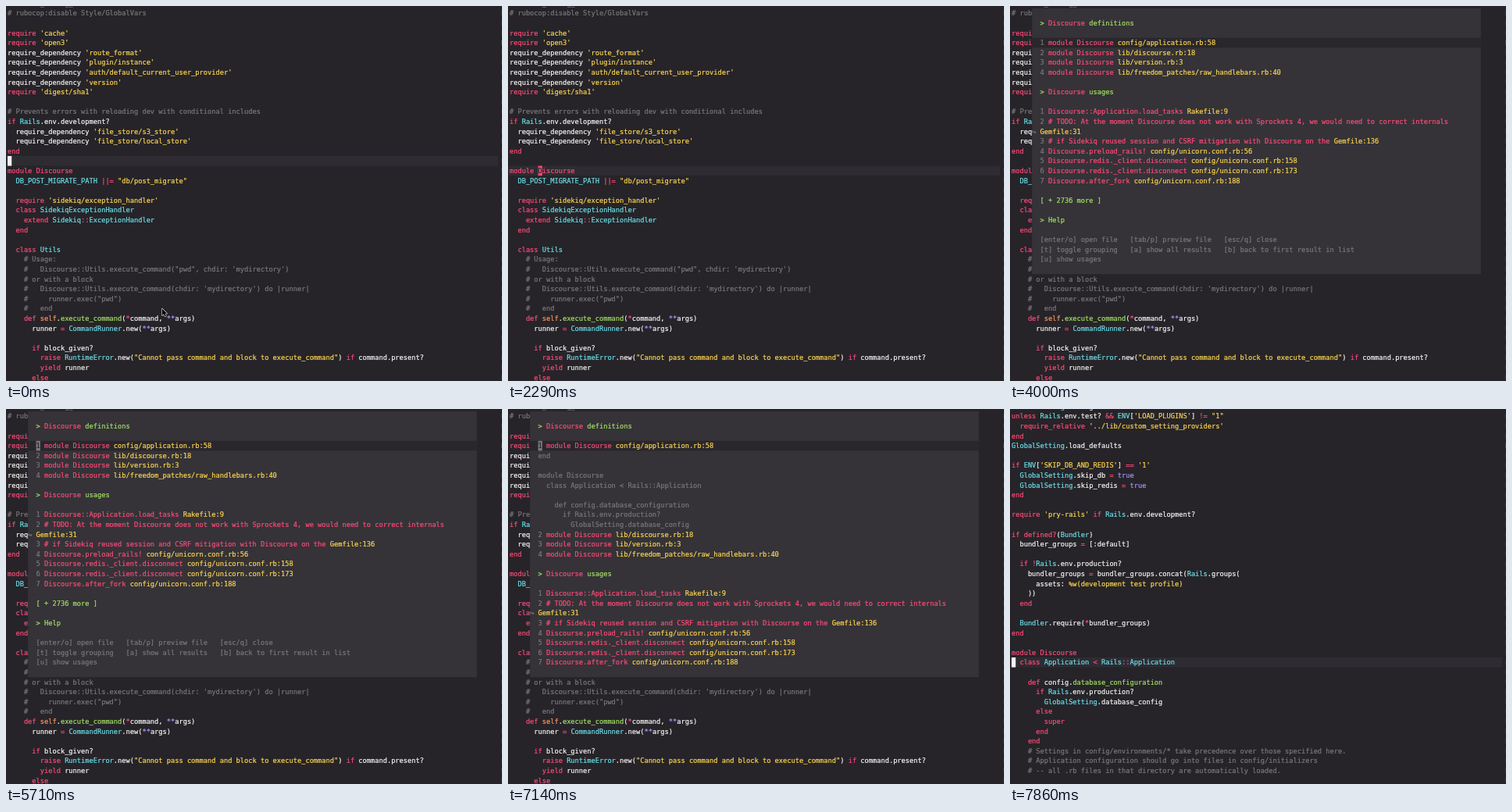
Write an HTML page with a canvas that moves like this. It is 635x480 px and loops after 8000 ms.

```html
<!DOCTYPE html>
<html lang="en">
<head>
<meta charset="utf-8">
<title>Jump to definition</title>
<style>
  html, body { margin: 0; width: 100%; height: 100%; overflow: hidden; background: #262429; }
  canvas { display: block; width: 635px; height: 480px; }
</style>
</head>
<body>
<canvas id="stage" width="635" height="480"></canvas>
<script>
const LOOP = 8000;
const LEFT = 2, TOP = 3, CELL_W = 5.225, CELL_H = 12.6, BASELINE = 9.4;
const BG = '#262429', LINE_BG = '#2e2c32', POPUP_BG = '#353338', POPUP_LINE = '#29272c';
const INK = {
  w: '#f8f6f3', p: '#ff4a78', y: '#ffd650', c: '#6ae0ea',
  g: '#a5e164', v: '#a795f6', o: '#ff9560', k: '#7a787b'
};

const canvas = document.getElementById('stage');
const ctx = canvas.getContext('2d');
ctx.font = '8.68px "DejaVu Sans Mono", "Liberation Mono", monospace';
ctx.letterSpacing = (CELL_W - ctx.measureText('m'.repeat(100)).width / 100) + 'px';

const library = String.raw`# frozen_string_literal: true
# rubocop:disable Style/GlobalVars

require 'cache'
require 'open3'
require_dependency 'route_format'
require_dependency 'plugin/instance'
require_dependency 'auth/default_current_user_provider'
require_dependency 'version'
require 'digest/sha1'

# Prevents errors with reloading dev with conditional includes
if Rails.env.development?
  require_dependency 'file_store/s3_store'
  require_dependency 'file_store/local_store'
end

module Discourse
  DB_POST_MIGRATE_PATH ||= "db/post_migrate"

  require 'sidekiq/exception_handler'
  class SidekiqExceptionHandler
    extend Sidekiq::ExceptionHandler
  end

  class Utils
    # Usage:
    #   Discourse::Utils.execute_command("pwd", chdir: 'mydirectory')
    # or with a block
    #   Discourse::Utils.execute_command(chdir: 'mydirectory') do |runner|
    #     runner.exec("pwd")
    #   end
    def self.execute_command(*command, **args)
      runner = CommandRunner.new(**args)

      if block_given?
        raise RuntimeError.new("Cannot pass command and block to execute_command") if command.present?
        yield runner
      else`;

const application = String.raw`require_relative '../app/models/global_setting'
GlobalSetting.configure!
unless Rails.env.test? && ENV['LOAD_PLUGINS'] != "1"
  require_relative '../lib/custom_setting_providers'
end
GlobalSetting.load_defaults

if ENV['SKIP_DB_AND_REDIS'] == '1'
  GlobalSetting.skip_db = true
  GlobalSetting.skip_redis = true
end

require 'pry-rails' if Rails.env.development?

if defined?(Bundler)
  bundler_groups = [:default]

  if !Rails.env.production?
    bundler_groups = bundler_groups.concat(Rails.groups(
      assets: %w(development test profile)
    ))
  end

  Bundler.require(*bundler_groups)
end

module Discourse
  class Application < Rails::Application

    def config.database_configuration
      if Rails.env.production?
        GlobalSetting.database_config
      else
        super
      end
    end
    # Settings in config/environments/* take precedence over those specified here.
    # Application configuration should go into files in config/initializers
    # -- all .rb files in that directory are automatically loaded.`;

// Popup lines: "~x" switches to ink x.
const definitions = `~k1 ~pmodule Discourse ~yconfig/application.rb:58
~k2 ~pmodule Discourse ~ylib/discourse.rb:18
~k3 ~pmodule Discourse ~ylib/version.rb:3
~k4 ~pmodule Discourse ~ylib/freedom_patches/raw_handlebars.rb:40`.split('\n');

const preview = `~kend

~kmodule Discourse
~k  class Application < Rails::Application

~k    def config.database_configuration
~k      if Rails.env.production?
~k        GlobalSetting.database_config`.split('\n');

const usages = `
~g> ~pDiscourse ~gusages

~k1 ~pDiscourse::Application.load_tasks ~yRakefile:9
~k2 ~p# TODO: At the moment Discourse does not work with Sprockets 4, we would need to correct internals
~yGemfile:31
~k3 ~p# if Sidekiq reused session and CSRF mitigation with Discourse on the ~yGemfile:136
~k4 ~pDiscourse.preload_rails! ~yconfig/unicorn.conf.rb:56
~k5 ~pDiscourse.redis._client.disconnect ~yconfig/unicorn.conf.rb:158
~k6 ~pDiscourse.redis._client.disconnect ~yconfig/unicorn.conf.rb:173
~k7 ~pDiscourse.after_fork ~yconfig/unicorn.conf.rb:188

~g[ + 2736 more ]

~g> Help

~k[enter/o] open file   [tab/p] preview file   [esc/q] close
~k[t] toggle grouping   [a] show all results   [b] back to first result in list
~k[u] show usages`.split('\n');

const heading = ['', '~g> ~pDiscourse ~gdefinitions', ''];
const resultList = [...heading, ...definitions, ...usages];
const previewList = [...heading, definitions[0], ...preview, ...definitions.slice(1), ...usages].slice(0, 27);

const RULES = [
  ['k', /^\s*#.*/],
  ['y', /'[^']*'|"[^"]*"|%w\([^)]*\)/],
  ['p', /module \w+/],
  ['g', /(?<=def \w+\.)\w+/],
  ['p', /(?<!\.)\b(?:require|require_relative|if|unless|else|end|class|extend|def|super|raise|yield)\b|defined\?/],
  ['o', /\bself\b/],
  ['v', /\btrue\b|\*\*/],
  ['c', /\b[A-Z]\w*/],
  ['p', /\|\|=|::|&&|[!=]=|[=<*]|!(?=[A-Z])/]
];
const lexer = new RegExp(RULES.map(r => '(' + r[1].source + ')').join('|'), 'g');

// Both parsers return runs of [column, text, ink].
function highlight(line) {
  const runs = [];
  let at = 0;
  for (const m of line.matchAll(lexer)) {
    if (m.index > at) runs.push([at, line.slice(at, m.index), 'w']);
    runs.push([m.index, m[0], RULES[m.slice(1).findIndex(g => g !== undefined)][0]]);
    at = m.index + m[0].length;
  }
  if (at < line.length) runs.push([at, line.slice(at), 'w']);
  return runs;
}

function parseMarkup(line) {
  let col = 0;
  return line.split('~').slice(1).map(part => {
    const run = [col, part.slice(1), part[0]];
    col += part.length - 1;
    return run;
  });
}

const files = [library, application].map(src => src.split('\n').map(highlight));
const popups = [resultList, previewList].map(list => list.map(parseMarkup));

const colX = col => LEFT + col * CELL_W;
const rowY = row => TOP + row * CELL_H;

function fill(color, x, y, w, h) {
  ctx.fillStyle = color;
  ctx.fillRect(x, y, w, h);
}

// A hairline stroke gives the glyphs their slightly heavy look.
function drawText(text, col, row, color) {
  ctx.fillStyle = ctx.strokeStyle = color;
  ctx.lineWidth = 0.2;
  ctx.fillText(text, colX(col), rowY(row) + BASELINE);
  ctx.strokeText(text, colX(col), rowY(row) + BASELINE);
}

function drawRuns(lines, col, row) {
  lines.forEach((runs, i) => {
    for (const [c, text, ink] of runs) drawText(text, col + c, row + i, INK[ink]);
  });
}

function drawBlock(col, row, char, ink) {
  fill(INK[ink], colX(col), rowY(row), CELL_W, CELL_H);
  if (char) drawText(char, col, row, BG);
}

function drawFile(lines, scroll, lineRow) {
  fill(BG, 0, 0, 635, 480);
  if (lineRow !== null) fill(LINE_BG, 0, rowY(lineRow), 630, CELL_H);
  drawRuns(lines.slice(scroll), 0, -1);
  for (let row = 0; row < 38; row++) fill('#3a383d', 634, rowY(row) + 3, 1, 6);
  fill('#8c2645', 634, 44, 1, 6);
}

function drawPopup(lines, blockOn) {
  fill(POPUP_BG, colX(5), rowY(0), 110 * CELL_W, 27 * CELL_H);
  fill(POPUP_LINE, colX(5), rowY(3), 110 * CELL_W, CELL_H);
  drawRuns(lines, 7, 0);
  drawText('↪', 5, lines === popups[0] ? 12 : 20, INK.k);
  if (blockOn) drawBlock(7, 3, '1', 'k');
}

const arrow = new Path2D('M0 0V8.6L2 6.8L3.4 10L4.9 9.3L3.5 6.2H6.2Z');

function drawPointer(t) {
  const u = Math.min(1, Math.max(0, (t - 100) / 1040));
  const e = u * u * (3 - 2 * u);
  ctx.save();
  ctx.translate(200 - 193 * e, 387.5 - 188 * e);
  ctx.lineWidth = 1.2;
  ctx.lineJoin = 'round';
  ctx.strokeStyle = '#e8e8e8';
  ctx.stroke(arrow);
  ctx.fillStyle = '#000';
  ctx.fill(arrow);
  ctx.restore();
}

const within = (t, from, to) => t >= from && t < to;

function render(t) {
  if (t < 1570) {
    drawFile(files[0], 0, 15);
    drawBlock(0, 15, '', 'w');
    drawPointer(t);
  } else if (t < 4000) {
    drawFile(files[0], 0, 16);
    if (t < 1710) drawBlock(0, 16, 'm', 'p');
    else if (t < 2570 || within(t, 3070, 3570)) drawBlock(7, 16, 'D', 'p');
  } else if (t < 7290) {
    drawFile(files[0], 0, null);
    drawPopup(popups[t < 6000 ? 0 : 1], within(t, 4570, 5070) || t >= 5710);
  } else {
    const moved = t >= 7640;
    drawFile(files[1], moved ? 1 : 0, 25);
    if (moved) drawBlock(0, 25, '', 'w');
    else drawBlock(0, 25, 'm', 'p');
  }
}

const start = performance.now();
function tick() {
  render((performance.now() - start) % LOOP);
  requestAnimationFrame(tick);
}
tick();
</script>
</body>
</html>
```
